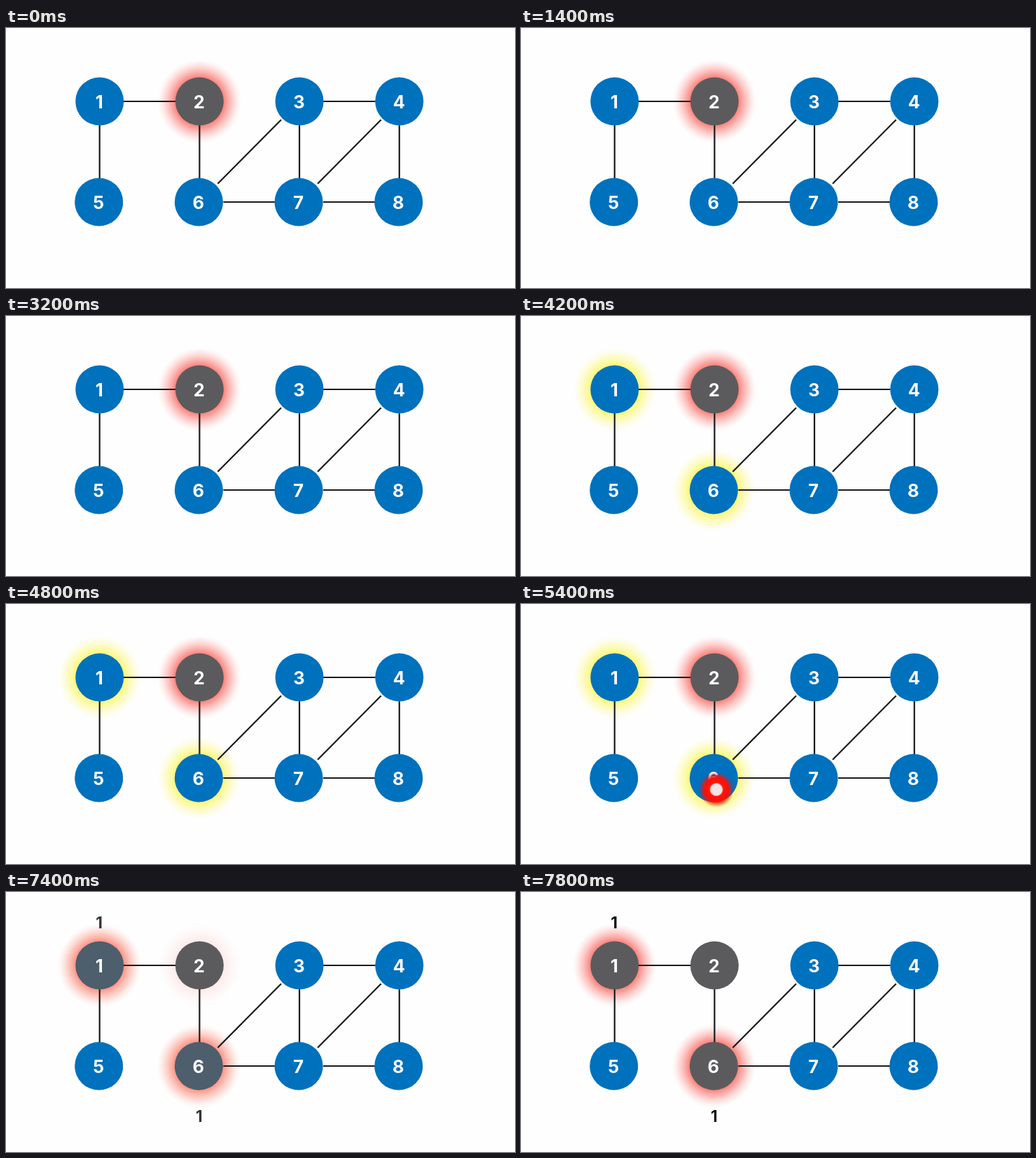
An HTML page that plays this animation: 727x372 px, repeating every 8000 ms.

```html
<!DOCTYPE html>
<html lang="en">
<head>
<meta charset="utf-8">
<title>Graph search</title>
<style>
  html, body { margin: 0; width: 100%; height: 100%; overflow: hidden; background: #fefefe; }
  svg { display: block; width: 100%; height: 100%; }
  text { font: 700 25.5px Inter, "Liberation Sans", sans-serif; text-anchor: middle; fill: #fff; }
  .label { font-size: 22.5px; fill: #111; }
  line { stroke: #1a1a1a; stroke-width: 2.2; }
</style>
</head>
<body>
<svg id="stage" viewBox="0 0 727 372"></svg>
<script>
const LOOP = 8000;
const RADIUS = 34.5, GLOW = 60;
const BLUE = [0, 113, 189], GRAY = [91, 91, 93];
const START = 2, FOUND = [1, 6];
const EDGES = "12 15 26 36 34 67 37 47 78 48".split(" ");

// Nodes 1 to 8 stand on a grid of four columns and two rows.
const place = n => {
  const row = n > 4 ? 1 : 0;
  return { x: 133.7 + 142.7 * ((n - 1) % 4), y: 105 + 144 * row, row };
};
// The lower row of discs sits slightly left of the edges' grid.
const center = n => {
  const { x, y, row } = place(n);
  return { x: x - row, y };
};

// Diagonal edges stop a little short of the discs.
function edge([a, b]) {
  const p = place(+a), q = place(+b);
  const dx = q.x - p.x, dy = q.y - p.y, length = Math.hypot(dx, dy);
  const gap = 34 + 6 * Math.abs(dx * dy) / length ** 2;
  const ux = dx / length * gap, uy = dy / length * gap;
  return `<line x1="${p.x + ux}" y1="${p.y + uy}" x2="${q.x - ux}" y2="${q.y - uy}"/>`;
}

function disc(n) {
  const { x, y } = center(n);
  return `<circle id="node${n}" cx="${x}" cy="${y}" r="${RADIUS}" fill="rgb(${n === START ? GRAY : BLUE})"/>
    <text x="${x - .5}" y="${y + 10}">${n}</text>`;
}

const glow = (n, color) =>
  `<circle cx="${center(n).x}" cy="${center(n).y}" r="${GLOW}" fill="url(#${color})"/>`;

// Step counts stand above the upper row and below the lower one.
function label(n) {
  const { x, y, row } = place(n);
  return `<text class="label" x="${x - .5}" y="${y + (row ? 79.5 : -53)}">1</text>`;
}

// Radial gradient that fades smoothly outside a disc's rim.
function glowGradient(id, color, strength) {
  const rim = RADIUS / GLOW, steps = 8;
  const stops = Array.from({ length: steps + 1 }, (_, i) => {
    const u = i / steps;
    return `<stop offset="${rim + (1 - rim) * u}" stop-color="${color}" stop-opacity="${strength * (1 - u) ** 1.4}"/>`;
  });
  return `<radialGradient id="${id}">${stops.join("")}</radialGradient>`;
}

const each = (list, draw) => list.map(item => draw(item)).join("");
const stage = document.getElementById("stage");
stage.innerHTML = `
  <defs>
    ${glowGradient("red", "#f8544c", .72)}
    ${glowGradient("yellow", "#fbf440", .68)}
    <radialGradient id="laser">
      <stop offset=".32" stop-color="#f6e2e2"/><stop offset=".4" stop-color="#ff1408"/>
      <stop offset=".68" stop-color="#f8100a"/><stop offset="1" stop-color="#f01010" stop-opacity="0"/>
    </radialGradient>
  </defs>
  <g id="current">${glow(START, "red")}</g>
  <g id="candidates">${each(FOUND, n => glow(n, "yellow"))}</g>
  <g id="visited">${each(FOUND, n => glow(n, "red"))}</g>
  ${each(EDGES, edge)}
  ${each([1, 2, 3, 4, 5, 6, 7, 8], disc)}
  <g id="labels">${each(FOUND, label)}</g>
  <circle id="pointer" cx="279" cy="265.5" r="25" fill="url(#laser)"/>`;

const set = (id, name, value) => document.getElementById(id).setAttribute(name, value);
const ramp = (t, start, end) => {
  const u = Math.min(1, Math.max(0, (t - start) / (end - start)));
  return u * u * (3 - 2 * u);
};

function draw(now) {
  const t = now % LOOP;
  const found = ramp(t, 3700, 4100);
  const visit = ramp(t, 7100, 7500);
  set("current", "opacity", 1 - visit);
  set("candidates", "opacity", found * (1 - visit));
  set("visited", "opacity", visit);
  set("labels", "opacity", visit);
  set("pointer", "opacity", t >= 5200 && t < 5800 ? 1 : 0);
  const color = BLUE.map((c, i) => Math.round(c + (GRAY[i] - c) * visit));
  for (const n of FOUND) set("node" + n, "fill", `rgb(${color})`);
  requestAnimationFrame(draw);
}
draw(performance.now());
</script>
</body>
</html>
```
